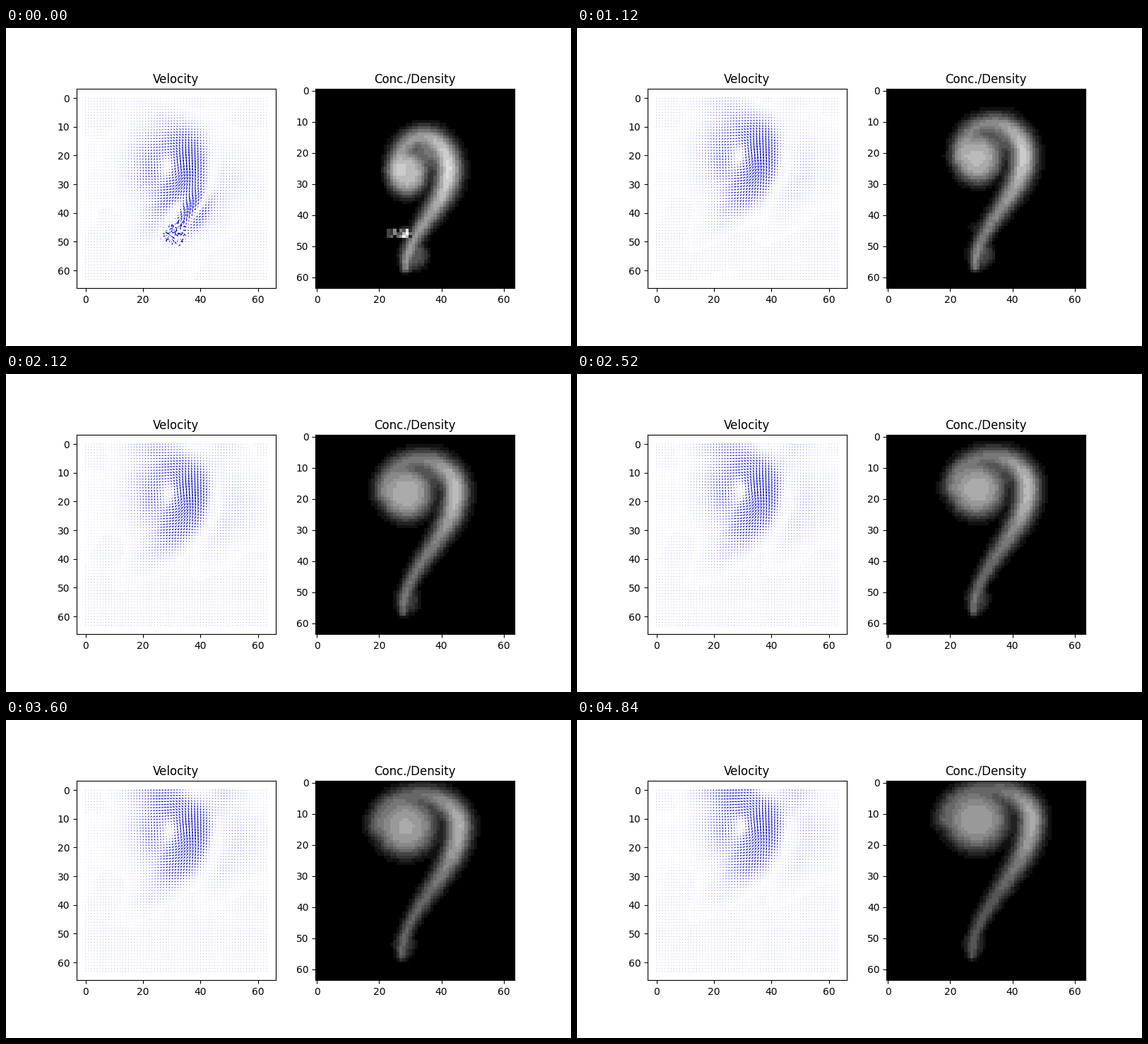
Write a matplotlib script that moves like this. It is 800x450 px and loops after 4880 ms.

```python
import numpy as np
import matplotlib.pyplot as plt
from matplotlib.animation import FuncAnimation
from matplotlib.patches import PathPatch
from matplotlib.path import Path

N = 64
FRAMES = 122
Y, X = np.mgrid[0:N, 0:N].astype(float)
rng = np.random.default_rng(4)

# Short-lived noise at the inlet: bright grains and a burst of arrows.
GRAINS = rng.random((3, 8)) * np.linspace(.3, 1.2, 8)
BURST = rng.normal(size=(2, N, N)) * 9 * np.exp(
    -((X - 31) ** 2 + (Y - 47.5) ** 2) / 11)


def mixer(i):
    """Interpolate from first to last state, slowing down."""
    p = i / (FRAMES - 1)
    ease = p * (1.55 - .55 * p)
    return lambda a, b: a + (b - a) * ease


def bell(x, y, wx, wy, power=1):
    return np.exp(-(((X - x) / wx) ** 2 + ((Y - y) / wy) ** 2) ** power)


def plume(mix):
    """Ridge of smoke: an arc over the curl, then an S-shaped stem."""
    cx, cy = mix(34, 32.3), mix(25.5, 12)
    rx, ry = mix(8.4, 14), mix(10.6, 10)
    foot_x, foot_y = mix(28.6, 27), mix(57, 55.5)
    out = np.zeros((N, N))
    for t in np.linspace(0, 2, 100):
        s = max(t - 1, 0)
        if t < 1:
            x = cx - rx * np.cos(np.pi * t)
            y = cy - ry * np.sin(np.pi * t)
        else:
            x = foot_x + (cx + rx - foot_x) * (1 + np.cos(np.pi * s)) / 2
            y = cy + (foot_y - cy) * s
        peak = np.exp(-((t - 1) / .35) ** 2)
        width = 3.6 + .7 * peak - 2 * s ** 2
        light = mix(.57, .35) + mix(.26, .32) * peak
        np.maximum(out, light * bell(x, y, width, width), out=out)
    return out


def density(i):
    mix = mixer(i)
    fade = (1 - i / FRAMES) ** 4
    layers = [
        plume(mix),
        mix(.74, .61) * bell(mix(29, 28.5), mix(26.5, 12),
                             mix(6.6, 10.5), mix(7.5, 10), 1.8),
        mix(.45, .2) * bell(mix(36, 39), mix(19.5, 6), 6.5, 7),
        mix(.35, .2) * bell(mix(31, 27.5), mix(53, 52), mix(5, 3.6), 4.8, 1.8),
        .36 * fade * bell(28.5, mix(45.8, 41), 3, 1.8, 1.8),
    ]
    out = np.cbrt(sum(layer ** 3 for layer in layers))
    inlet = out[45:48, 23:31]
    inlet += np.exp(-i / 2) * (GRAINS - inlet)
    return np.clip(out, 0, 1)


def velocity(i):
    """Rightward and upward speed, in arrow widths."""
    mix = mixer(i)

    def swirl(x, y, sx, sy):
        dx = X - x + .018 * np.maximum(Y - y, 0) ** 2
        return 1 / (1 + (dx / sx) ** 2 + ((Y - y) / sy) ** 2)

    psi = mix(125, 108) * swirl(mix(30.5, 31), mix(24, 12.5), 11, 13)
    psi -= mix(95, 80) * swirl(mix(40, 43), mix(27, 15), 12, 18)

    dx = X - 35.5 + .5 * (Y - 40)
    psi -= 10 * np.exp(-i / 7) * dx * np.exp(
        -(dx / 4) ** 2 - ((Y - 40) / 6.5) ** 2)

    # No flow through the walls.
    for gap in (X, N - 1 - X, Y, N - 1 - Y):
        psi *= np.tanh((gap + 2) / 6)
    slope_y, slope_x = np.gradient(psi)
    burst = np.exp(-i / 2) * BURST
    return burst[0] - slope_y, burst[1] - slope_x


UNIT = .0024 * 69.3          # arrow width in data units
ORDER = [0, 1, 2, 3, 2, 1, 0, 0]
HALF = np.array([.5, .5, 1.5, 0])[ORDER] * np.where(np.arange(8) % 7 < 3, 1, -1)
HALF[-1] = .5
STUB = np.array([0, .5, 0, 5])[ORDER]
BACK = np.array([0, 4.5, 5, 0])[ORDER]
REACH = np.array([0, 1, 1, 1])[ORDER]
HEX = -np.arange(8) * np.pi / 3
CODES = np.tile([Path.MOVETO] + [Path.LINETO] * 6 + [Path.CLOSEPOLY], N * N)


def arrows(u, v):
    """All arrows as one path; tiny ones shrink, the smallest become dots."""
    u, v = u.reshape(-1, 1), v.reshape(-1, 1)
    size = np.hypot(u, v)
    angle = np.arctan2(v, u)
    shrink = np.minimum(size / 5, 1)
    along = np.where(size < 5, STUB * shrink, size * REACH - BACK)
    across = HALF * shrink
    along = np.where(size < 1, .5 * np.cos(HEX), along)
    across = np.where(size < 1, .5 * np.sin(HEX), across)
    c, s = np.cos(angle), np.sin(angle)
    px = X.reshape(-1, 1) + UNIT * (along * c - across * s)
    py = Y.reshape(-1, 1) - UNIT * (along * s + across * c)
    return Path(np.column_stack([px.ravel(), py.ravel()]), CODES)


fig, (left, right) = plt.subplots(1, 2, figsize=(8, 4.5), dpi=100)
left.set_title("Velocity")
left.set_xlim(-3.15, 66.15)
left.set_ylim(66.15, -3.15)
left.set_aspect("equal")
field = left.add_patch(
    PathPatch(arrows(*velocity(0)), fc="blue", lw=0, snap=False))
right.set_title("Conc./Density")
image = right.imshow(density(0), cmap=plt.get_cmap("gray", 16), vmin=0, vmax=1)


def draw(i):
    field.set_path(arrows(*velocity(i)))
    image.set_data(density(i))
    return field, image


anim = FuncAnimation(fig, draw, frames=FRAMES, interval=40, repeat=True,
                     repeat_delay=0, cache_frame_data=False)
plt.show()
```
